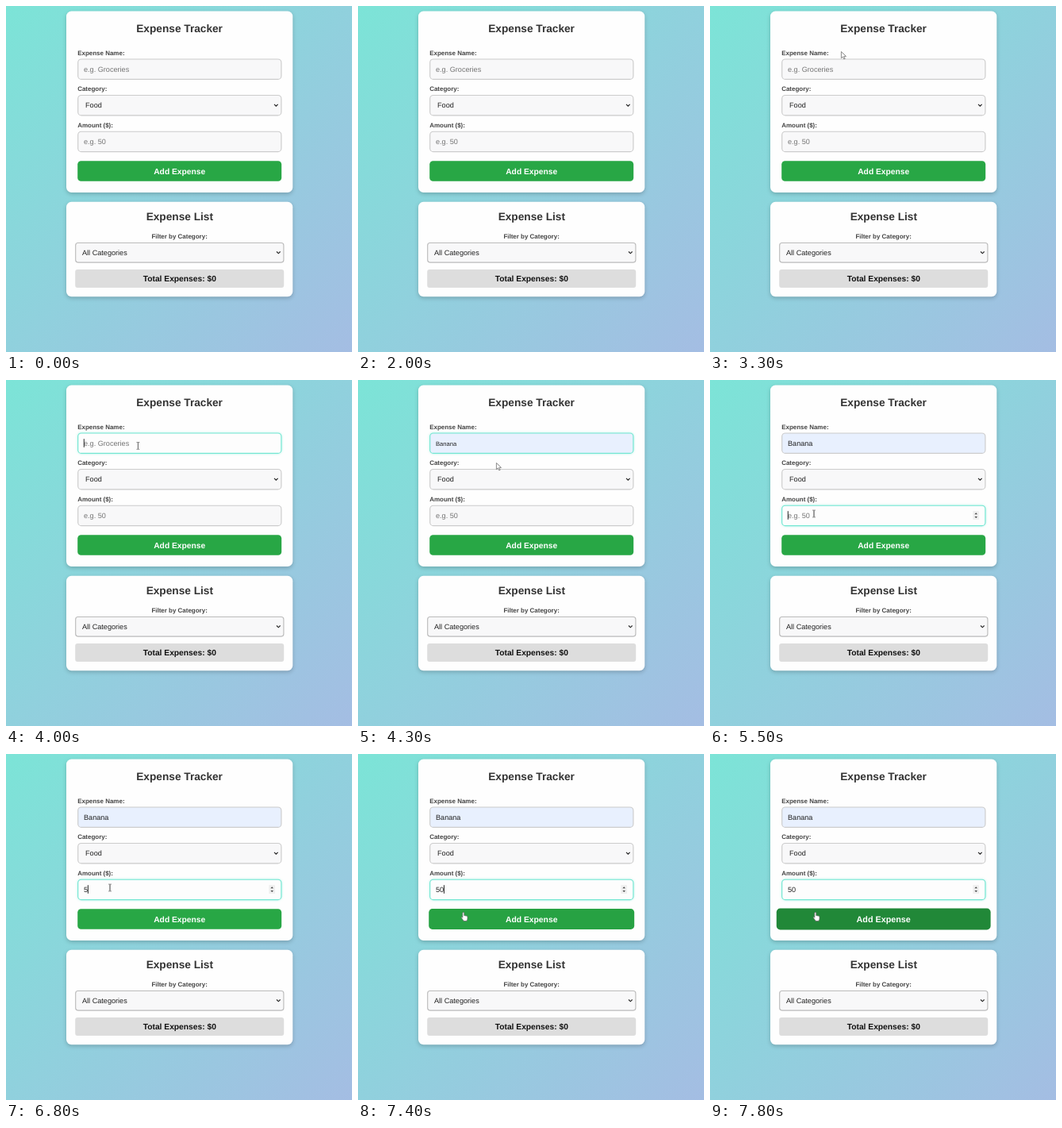
Write an HTML page that moves like this. It is 436 px wide and 436 px high and loops after 8000 ms.

```html
<!DOCTYPE html>
<html lang="en">
<head>
<meta charset="utf-8">
<title>Expense Tracker</title>
<style>
  html, body { margin: 0; width: 100%; height: 100%; overflow: hidden; }
  svg { display: block; width: 100vw; height: 100vh; }
  text { font-family: "Liberation Sans", Arial, sans-serif; text-rendering: geometricPrecision; fill: #222; font-size: 9.12px; }
  .mid { text-anchor: middle; }
  .title { font-size: 13.68px; font-weight: bold; fill: #333; }
  .label { font-size: 7.98px; font-weight: bold; fill: #444; }
  .big { font-size: 10.26px; font-weight: bold; }
  .card { fill: #fefefe; filter: drop-shadow(0 2.3px 2.8px rgba(0, 0, 0, .2)); }
  .field { fill: #f8f8f9; stroke: #ccc; stroke-width: 1.14; }
  .field.filled { fill: #e8f0fe; }
  .field.focus { stroke: #74e6d2; filter: drop-shadow(0 0 1.4px rgba(116, 235, 213, .55)); }
  .field.focus:not(.filled) { fill: #fdfdfd; }
  .hint { fill: #757575; }
  .chev { fill: none; stroke: #222; stroke-width: 1.15; }
  .pointer { fill: #fff; stroke: #666; stroke-width: .75; stroke-linejoin: round; }
</style>
</head>
<body>
<svg viewBox="0 0 436 436">
  <defs>
    <linearGradient id="sky" x1="0" y1="0" x2="1" y2="1">
      <stop offset="0" stop-color="rgb(124,228,215)"/>
      <stop offset="1" stop-color="rgb(164,189,227)"/>
    </linearGradient>
  </defs>
  <rect width="436" height="436" fill="url(#sky)"/>

  <rect class="card" x="76" y="6.6" width="285.3" height="228.4" rx="6.5"/>
  <text class="title mid" x="218.6" y="32.9">Expense Tracker</text>
  <text class="label" x="90.2" y="61.7">Expense Name:</text>
  <rect class="field" id="nameBox" x="90.7" y="67" width="256.2" height="25.4" rx="4.2"/>
  <text id="name" x="98" y="82.7"></text>
  <text class="label" x="90.2" y="107.2">Category:</text>
  <rect class="field" x="90.7" y="112.5" width="256.2" height="25.4" rx="4.2"/>
  <text x="100" y="128.4">Food</text>
  <path class="chev" d="M338 123.8l2.3 2.3 2.3-2.3"/>
  <text class="label" x="90.2" y="152.7">Amount ($):</text>
  <rect class="field" id="sumBox" x="90.7" y="158.2" width="256.2" height="25.4" rx="4.2"/>
  <text id="sum" x="98" y="173.7"></text>
  <g id="spin">
    <rect x="331.3" y="165.2" width="7.6" height="10.8" fill="#efefef"/>
    <path d="M333.4 169.3l1.8-2.1 1.8 2.1zM333.4 172l1.8 2.1 1.8-2.1z" fill="#444"/>
  </g>
  <rect id="caret" y="0" width=".9" height="10.6" fill="#111"/>
  <g id="button">
    <rect id="face" x="90.2" y="195.2" width="257" height="25.6" rx="4.4"/>
    <text class="big mid" x="218.7" y="211.8" style="fill:#fff">Add Expense</text>
  </g>

  <rect class="card" x="76" y="246.8" width="285.3" height="119.4" rx="6.5"/>
  <text class="title mid" x="218.8" y="270">Expense List</text>
  <text class="label mid" x="218.6" y="293.3">Filter by Category:</text>
  <rect class="field" x="87.7" y="298.5" width="262.2" height="24.6" rx="3" style="stroke:#bbb"/>
  <text x="96" y="314.2">All Categories</text>
  <path class="chev" d="M341 309.5l2.3 2.3 2.3-2.3"/>
  <rect x="87.2" y="332" width="263" height="22.9" rx="3" fill="#ddd"/>
  <text class="big mid" x="218.8" y="346.8" style="fill:#111">Total Expenses: $0</text>

  <g id="mouse">
    <path id="arrow" class="pointer" d="M.4.5v8.2l2-1.8 1.4 3 1.4-.6-1.4-2.9h2.7z"/>
    <path id="beam" d="M-1.9-4.4h1.4q.5 0 .5.5v7.8q0 .5-.5.5h-1.4M1.9-4.4h-1.4q-.5 0-.5.5v7.8q0 .5.5.5h1.4" fill="none" stroke="#666" stroke-width=".8"/>
    <path id="hand" class="pointer" d="M-1.2 6.6V.9a1 1 0 0 1 2 0v3.2q.9-.5 1.6.2q.9-.4 1.5.3q1.1-.2 1.1.9v2.3q0 1.3-.8 2.2v.9h-4.300v-.8q-1.400-1.300-2.500-3.300q-.6-1 .3-1.200q.5 0 1.100 1z"/>
  </g>
</svg>
<script>
const $ = id => document.getElementById(id);
const LOOP = 8000, STEP = 100;
const ADVANCE = 5.07; // width of one digit

// pointer hot spot: [ms, x, y]
const path = [
  [2900, 250, 396], [3300, 165, 57], [3400, 165, 57], [3700, 165, 79],
  [3900, 165, 79], [4300, 174, 104], [4500, 174, 104],
  [5400, 131, 168.5], [7000, 131, 168.5], [7400, 133, 199.6]
];

const clamp = v => Math.max(0, Math.min(1, v));
const show = (id, on) => $(id).style.display = on ? "" : "none";
const mix = (a, b, k) => a + (b - a) * k;

function pointerAt(t) {
  let i = 0;
  while (i < path.length - 2 && t >= path[i + 1][0]) i++;
  const [t0, x0, y0] = path[i], [t1, x1, y1] = path[i + 1];
  const p = clamp((t - t0) / (t1 - t0)), k = p * p * (3 - 2 * p);
  return [mix(x0, x1, k), mix(y0, y1, k)];
}

// the CSS "ease" curve
function ease(p) {
  let a = 0, b = 1;
  for (let i = 0; i < 24; i++) {
    const s = (a + b) / 2;
    const x = .75 * s * (1 - s) * (1 - s) + .75 * s * s * (1 - s) + s * s * s;
    if (x < p) a = s; else b = s;
  }
  return .3 * a * (1 - a) * (1 - a) + 3 * a * a * (1 - a) + a * a * a;
}

function write(id, value, hint, size) {
  $(id).textContent = value || hint;
  $(id).setAttribute("class", value ? "" : "hint");
  $(id).style.fontSize = size + "px";
}

function draw(t) {
  const [x, y] = pointerAt(t);
  const onName = t >= 3800 && t < 5500, onSum = t >= 5500;
  const preview = t >= 4200 && t < 4600, filled = t >= 4200;
  const amount = t >= 7000 ? "50" : t >= 6800 ? "5" : "";

  write("name", filled ? "Banana" : "", "e.g. Groceries", preview ? 7.6 : 9.12);
  write("sum", amount, "e.g. 50", 9.12);
  $("nameBox").classList.toggle("filled", filled);
  $("nameBox").classList.toggle("focus", onName);
  $("sumBox").classList.toggle("focus", onSum);

  const overName = y > 67 && y < 93, overSum = y > 158 && y < 184;
  const overButton = y > 195 && y < 221 && t > 7000;
  show("mouse", t >= 2900);
  $("mouse").setAttribute("transform", `translate(${x} ${y})`);
  show("beam", overName || overSum);
  show("hand", overButton);
  show("arrow", !overName && !overSum && !overButton);
  show("spin", onSum || (overSum && t > 4600));

  // the caret restarts its blink after each click or key
  const start = [7000, 6800, 5500, 4600, 3800].find(s => t >= s);
  show("caret", start !== undefined && !preview && (t - start) % 1000 < 500);
  $("caret").setAttribute("x", onSum ? 97.8 + amount.length * ADVANCE : filled ? 129.6 : 97.8);
  $("caret").setAttribute("y", onSum ? 165.2 : 74.2);

  const k = ease(clamp((t - 7360) / 300)), scale = 1 + .05 * k;
  $("button").setAttribute("transform", `translate(218.7 208) scale(${scale}) translate(-218.7 -208)`);
  $("face").setAttribute("fill", `rgb(${mix(40, 33, k)},${mix(167, 136, k)},${mix(69, 56, k)})`);
}

function tick() {
  const t = performance.now() % LOOP;
  draw(Math.floor(t / STEP) * STEP);
  requestAnimationFrame(tick);
}
tick();
</script>
</body>
</html>
```
